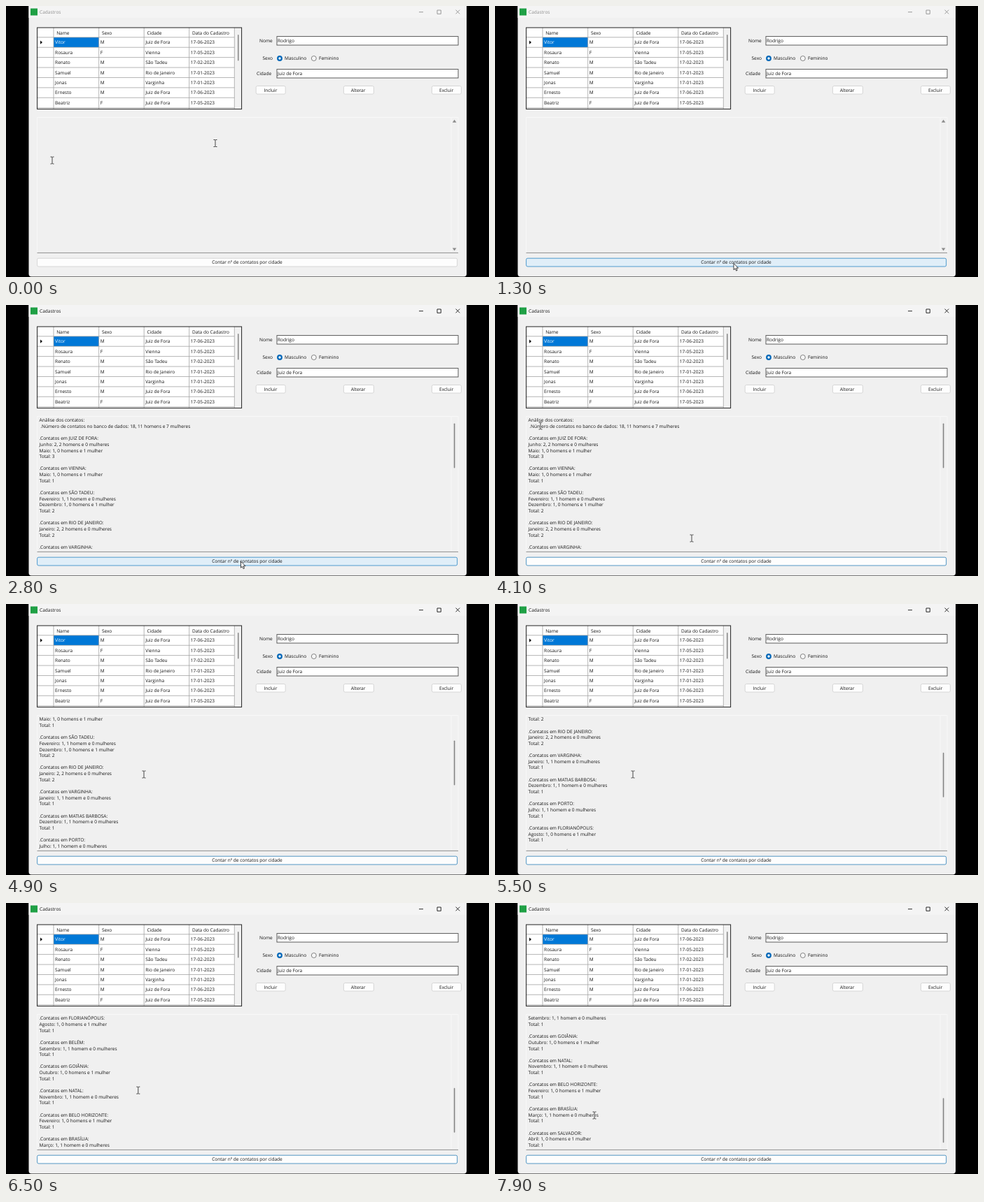
These frames come from a looping animation (690 by 388 pixels, 8000 ms). An HTML page:

```html
<!DOCTYPE html>
<html lang="pt">
<head>
<meta charset="utf-8">
<title>Cadastros</title>
<style>
html, body { margin: 0; width: 100%; height: 100%; overflow: hidden; background: #000; }
svg { display: block; width: 690px; height: 388px; }
text { font: 6.55px "Open Sans", "Noto Sans", sans-serif; fill: #151515; white-space: pre; text-rendering: geometricPrecision; }
.field { fill: #fff; stroke: #4a4a4a; stroke-width: .9; }
.button { fill: #fdfdfd; stroke: #cfcfcf; stroke-width: .8; }
.focus { stroke: #2a7fb8; }
.hover { fill: #e0eef8; stroke: #2a86c4; }
#title { --ink: #8f8f8f; }
#title.active { --ink: #151515; }
#title text { fill: var(--ink); }
#title path { fill: none; stroke: var(--ink); stroke-width: .9; }
</style>
</head>
<body>
<svg id="stage" viewBox="0 0 690 388">
  <defs>
    <clipPath id="gridClip"><rect x="44" y="31" width="293" height="116.5"/></clipPath>
    <clipPath id="memoClip"><rect x="45" y="160" width="590" height="192"/></clipPath>
    <g id="beam" fill="none">
      <path d="M-2.5-5H-.6L0-4.4.6-5H2.5M0-4.4V4.4M-2.5 5H-.6L0 4.4.6 5H2.5" stroke="#fff" stroke-width="2"/>
      <path d="M-2.5-5H-.6L0-4.4.6-5H2.5M0-4.4V4.4M-2.5 5H-.6L0 4.4.6 5H2.5" stroke="#222" stroke-width=".9"/>
    </g>
    <path id="arrow" d="M0 0V9.2L2.1 7.3 3.6 10.6 5.1 9.9 3.7 6.7H6.5Z" fill="#fff" stroke="#111" stroke-width=".8"/>
  </defs>
  <rect x="32.5" y="-6" width="625.5" height="393.5" rx="4" fill="#f0f0f0"/>
  <path d="M32.5 0H658V17H32.5Z" fill="#f4f4f4"/>
  <g id="title">
    <rect x="35" y="3.5" width="10" height="10" fill="#1fa045"/>
    <text x="48" y="10.9">Cadastros</text>
    <path d="M590 8.7H596M616 6H621.3V11.3H616ZM642.5 5.6L648.2 11.3M648.2 5.6L642.5 11.3"/>
  </g>
  <g id="grid" clip-path="url(#gridClip)"></g>
  <rect x="44.6" y="31" width="292" height="116.6" fill="none" stroke="#222"/>
  <g id="form"></g>
  <path d="M44.5 353V159.5H646V353M636 160V352" fill="none" stroke="#f8f8f8"/>
  <path d="M44.5 353.4H646" stroke="#858585" stroke-width=".9"/>
  <path id="idleBar" d="M637.8 166.8L640.6 162.8 643.4 166.8ZM637.8 346.6L640.6 350.6 643.4 346.6Z" fill="#8b8b8b"/>
  <g id="memo" clip-path="url(#memoClip)"><g id="lines"></g></g>
  <rect id="thumb" x="639.8" width="1.6" height="64" rx=".8" fill="#858585"/>
  <rect id="count" class="button" x="44.6" y="361.2" width="600" height="11.8" rx="2"/>
  <text x="344.5" y="369.4" text-anchor="middle">Contar nº de contatos por cidade</text>
  <use id="stale" href="#beam"/>
  <use id="cursor"/>
</svg>
<script>
const $ = id => document.getElementById(id);

function add(parent, tag, attrs, text = "") {
  const el = document.createElementNS("http://www.w3.org/2000/svg", tag);
  for (const key in attrs) el.setAttribute(key, attrs[key]);
  el.textContent = text;
  $(parent).append(el);
  return el;
}
const label = (parent, x, y, text, attrs) => add(parent, "text", { x, y, ...attrs }, text);
const box = (parent, x, y, width, height, attrs) => add(parent, "rect", { x, y, width, height, ...attrs });

// Grid
const rows = `Vitor,M,Juiz de Fora,17-06-2023
Rosaura,F,Vienna,17-05-2023
Renato,M,São Tadeu,17-02-2023
Samuel,M,Rio de Janeiro,17-01-2023
Jonas,M,Varginha,17-01-2023
Ernesto,M,Juiz de Fora,17-06-2023
Beatriz,F,Juiz de Fora,17-05-2023`.split("\n").map(row => row.split(","));
const columns = [68, 132.7, 197.2, 261.7];
const rowHeight = 14.42;

box("grid", 44, 31, 282.5, 117, { fill: "#fff" });
box("grid", 326.5, 31, 10, 117, { fill: "#f2f2f2" });
box("grid", 68, 45, 64.7, 14, { fill: "#0078d7" });
const ruling = [...columns, 326.3].map(x => `M${x} 31V148`).join("") +
  Array.from({ length: 8 }, (_, i) => `M44 ${44.8 + i * rowHeight}H326.3`).join("");
add("grid", "path", { d: ruling, stroke: "#a3a3a3", "stroke-width": .8 });
add("grid", "path", { d: "M49 49.4V54.8L52 52.1Z", fill: "#111" });
box("grid", 331, 41, 1.5, 37.5, { rx: .7, fill: "#858585" });
["Name", "Sexo", "Cidade", "Data do Cadastro"].forEach((s, i) => label("grid", columns[i] + 4.2, 40.5, s));
rows.forEach((row, r) => row.forEach((s, c) =>
  label("grid", columns[c] + 2.1, 54.3 + r * rowHeight, s, r + c ? {} : { style: "fill:#fff" })));

// Form
const field = (x, y, name, value) => {
  label("form", x, y + 8, name);
  box("form", 387, y, 259, 12.4, { class: "field" });
  label("form", 388, y + 8, value);
};
field(362, 43.6, "Nome", "Rodrigo");
field(358, 90.6, "Cidade", "Juiz de Fora");
label("form", 366.5, 77.4, "Sexo");
label("form", 398, 77.4, "Masculino");
label("form", 447, 77.4, "Feminino");
add("form", "circle", { cx: 391, cy: 75, r: 2.8, fill: "#fff", stroke: "#0067b8", "stroke-width": 2.2 });
add("form", "circle", { cx: 439.8, cy: 75, r: 3.5, fill: "#f5f5f5", stroke: "#777", "stroke-width": .9 });
[[357.2, "Incluir"], [482.4, "Alterar"], [608.4, "Excluir"]].forEach(([x, s], i) => {
  box("form", x, 114.5, i == 1 ? 43 : 42, 11.6, { class: "button", rx: 2 });
  label("form", x + 20.7, 122.6, s, { "text-anchor": "middle" });
});

// Report: city, then month with men and women
const cities = `JUIZ DE FORA,Junho 2 0,Maio 0 1
VIENNA,Maio 0 1
SÃO TADEU,Fevereiro 1 0,Dezembro 0 1
RIO DE JANEIRO,Janeiro 2 0
VARGINHA,Janeiro 1 0
MATIAS BARBOSA,Dezembro 1 0
PORTO,Julho 1 0
FLORIANÓPOLIS,Agosto 0 1
BELÉM,Setembro 1 0
GOIÂNIA,Outubro 0 1
NATAL,Novembro 1 0
BELO HORIZONTE,Fevereiro 0 1
BRASÍLIA,Março 1 0
SALVADOR,Abril 0 1`.split("\n");
const people = (men, women) =>
  `${men + women}, ${men} ${men == 1 ? "homem" : "homens"} e ${women} ${women == 1 ? "mulher" : "mulheres"}`;
const report = ["Análise dos contatos:", ` .Número de contatos no banco de dados: ${people(11, 7)}`];
for (const entry of cities) {
  const [city, ...months] = entry.split(",");
  let total = 0;
  report.push("", `.Contatos em ${city}:`);
  for (const item of months) {
    const [month, men, women] = item.split(" ");
    total += +men + +women;
    report.push(`${month}: ${people(+men, +women)}`);
  }
  report.push(`Total: ${total}`);
}
const lineHeight = 8.645;
report.forEach((s, i) => label("lines", 47.6, 167.3 + i * lineHeight, s));

// Timeline
const path = [
  [0, 66, 221], [500, 339, 221], [600, 339, 221], [1100, 341, 368.5], [1500, 341, 368.5],
  [2300, 335.5, 367], [2800, 335.5, 367], [3600, 281, 334], [4000, 65, 173], [4100, 65, 173],
  [4200, 57, 163], [4500, 197, 244], [5700, 197, 244], [6000, 193, 259], [6600, 188, 270],
  [7500, 142, 304], [8000, 142, 304]
];
const scrolls = [
  [0, 0], [4600, 3], [4700, 6], [4800, 9], [5000, 12], [5400, 15], [5800, 21],
  [5900, 24], [6000, 27], [6200, 30], [6400, 33], [6600, 36], [6700, 38]
];

function pointAt(t) {
  const i = path.findIndex(key => key[0] > t);
  const [t0, x0, y0] = path[i - 1], [t1, x1, y1] = path[i];
  const k = (t - t0) / (t1 - t0);
  return [x0 + (x1 - x0) * k, y0 + (y1 - y0) * k];
}
const place = (id, x, y) => $(id).setAttribute("transform", `translate(${x} ${y})`);
const show = (id, on) => $(id).style.display = on ? "" : "none";

function draw(now) {
  const t = Math.floor(now % 8000 / 100) * 100;
  const [x, y] = pointAt(t);
  const top = scrolls.findLast(key => key[0] <= t)[1];
  const filled = t >= 2500;

  $("cursor").setAttribute("href", y > 353 ? "#arrow" : "#beam");
  place("cursor", x, y);
  // A lagging second pointer trails the quick moves
  show("stale", t < 300 || t >= 3700 && t < 4300);
  if (t < 300) place("stale", 299, 196.5);
  else place("stale", 281, 334);

  $("title").classList.toggle("active", t >= 2400);
  $("count").classList.toggle("focus", t >= 2400);
  $("count").classList.toggle("hover", y > 361);
  show("memo", filled);
  show("thumb", filled);
  show("idleBar", !filled);
  place("lines", 0, -top * lineHeight);
  $("thumb").setAttribute("y", 169.5 + top * 2.89);
  requestAnimationFrame(draw);
}
draw(performance.now());
</script>
</body>
</html>
```
